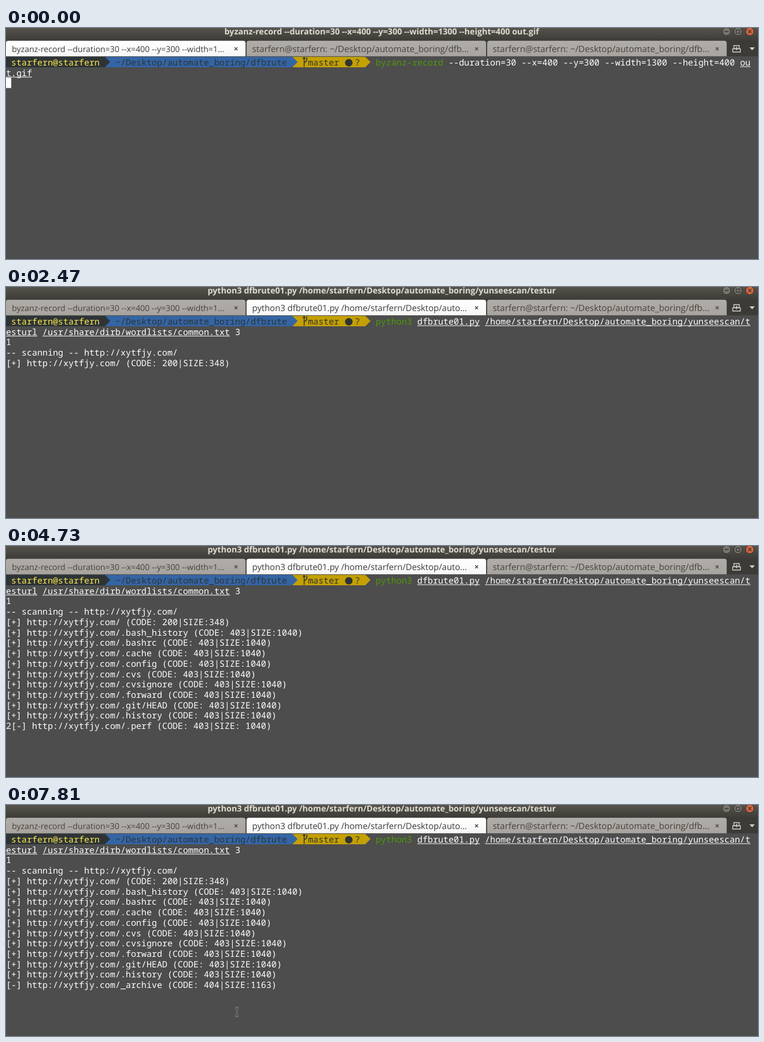
Write an HTML page that moves like this. It is 1280 px wide and 394 px high and loops after 8000 ms.

```html
<!DOCTYPE html>
<html lang="en">
<head>
<meta charset="utf-8">
<title>Terminal scan</title>
<style>
  html, body { margin: 0; width: 100%; height: 100%; overflow: hidden; background: #4d4d4d; }
  svg { display: block; width: 1280px; height: 394px; }
  text { white-space: pre; text-rendering: geometricPrecision; }
  .ui { font-family: "Open Sans", "Noto Sans", sans-serif; }
  .title { font-size: 14.1px; font-weight: 700; fill: #dfdbd2; text-anchor: middle; }
  .mono { font-family: "Noto Sans Mono", "DejaVu Sans Mono", monospace; font-size: 14.77px; fill: #fff; }
  .tab rect { fill: url(#idle); }
  .tab text { fill: #46433e; font-size: 14.9px; }
  .tab path { stroke: #46433e; stroke-width: 1.2; fill: none; }
  .tab.on rect { fill: url(#live); }
  .tab.on text { fill: #3c3c3c; font-size: 14.6px; }
  .tab.on path { stroke: #3c3c3c; }
</style>
</head>
<body>
<svg id="stage" viewBox="0 0 1280 394">
  <defs>
    <linearGradient id="bar" x2="0" y2="1">
      <stop offset="0" stop-color="#55534b"/><stop offset="1" stop-color="#3d3c38"/>
    </linearGradient>
    <linearGradient id="live" x2="0" y2="1">
      <stop offset="0" stop-color="#fff"/><stop offset="1" stop-color="#f4f3f2"/>
    </linearGradient>
    <linearGradient id="idle" x2="0" y2="1">
      <stop offset="0" stop-color="#b0aca7"/><stop offset="1" stop-color="#a5a19c"/>
    </linearGradient>
    <clipPath id="strip"><rect y="21" width="1280" height="27.250"/></clipPath>
  </defs>
  <rect width="1280" height="394" fill="#4d4d4d"/>
  <rect width="1280" height="21" fill="url(#bar)"/>
  <rect y="21" width="1280" height="27.250" fill="#3c3b37"/>
  <text id="title" class="ui title" x="639.5" y="11"></text>

  <g stroke="#33322e" stroke-width="1">
    <circle cx="1226.500" cy="6" r="7" fill="#78756d"/>
    <circle cx="1246" cy="6" r="7" fill="#78756d"/>
    <circle cx="1266" cy="6" r="7" fill="#d9643e"/>
  </g>
  <g stroke="#3a3934" stroke-width="1.300" fill="none">
    <path d="M1223 6h7M1243 3.500h6v5.500h-6zM1263.300 3.300l5.400 5.400M1268.700 3.300l-5.400 5.400"/>
  </g>

  <g id="tabs" clip-path="url(#strip)"></g>
  <g stroke="#d3cfc7" stroke-width="1.400" fill="none">
    <path d="M1239 35v-5h9v5M1237 35.500h13v5.500h-13zM1243.500 32v6M1240.500 35h6"/>
  </g>
  <path d="M1265.500 33h9l-4.500 5z" fill="#d3cfc7"/>

  <g id="prompt">
    <path d="M488 49.230h123.500l9 8.860l-9 8.860H488z" fill="#c4a000"/>
    <path d="M169 49.230h318.400l9 8.860l-9 8.860H169z" fill="#3465a4"/>
    <path d="M0 49.230h168.400l9 8.860l-9 8.860H0z" fill="#2e3436"/>
    <path d="M507.500 50.200v16M512 50.200v4q0 3-4.500 5M505.500 52.700l2-2.500l2 2.500" fill="none" stroke="#2e3436" stroke-width="1.500"/>
    <circle cx="583.500" cy="59.300" r="6.400" fill="#2e3436"/>
  </g>
  <g id="screen"></g>
  <g id="mouse" fill="none">
    <path d="M-3-7h2l1 1l1-1h2M0-6v12M-3 7h2l1-1l1 1h2" stroke="#fff" stroke-width="2.400" stroke-opacity=".7"/>
    <path d="M-3-7h2l1 1l1-1h2M0-6v12M-3 7h2l1-1l1 1h2" stroke="#111" stroke-width="1.200"/>
  </g>
</svg>
<script>
const LOOP = 8000, CELL = 1280 * 9 / 1300, ROW = CELL * 2, TOP = 49.23, BASE = 64;
const USER = "starfern", SITE = "http://xytfjy.com/";
const $ = id => document.getElementById(id);

function add(parent, tag, attrs, text) {
  const el = document.createElementNS("http://www.w3.org/2000/svg", tag);
  for (const k in attrs) el.setAttribute(k, attrs[k]);
  if (text !== undefined) el.textContent = text;
  return parent.appendChild(el);
}

// Text on the character grid, optionally underlined
function put(parent, col, row, text, fill = "#fff", line = false) {
  const x = col * CELL, y = BASE + row * ROW;
  add(parent, "text", { class: "mono", x, y, style: `fill:${fill}` }, text);
  if (line) add(parent, "rect", { x, y: y + 1.5, width: text.length * CELL, height: 1, fill });
}

const prompt = $("prompt");
put(prompt, 1, 0, `${USER}@${USER}`, "#fce94f");
put(prompt, 21, 0, "~/Desktop/automate_boring/dfbrute", "#2e3436");
put(prompt, 58, 0, "master", "#2e3436");
put(prompt, 67, 0, "?", "#2e3436");

const GREEN = "#4e9a06";
const record = [
  [71, 0, "byzanz-record", GREEN],
  [85, 0, "--duration=30 --x=400 --y=300 --width=1300 --height=400"],
  [141, 0, "ou", "#fff", true],
  [0, 1, "t.gif", "#fff", true]
];
const scan = [
  [71, 0, "python3", GREEN],
  [79, 0, "dfbrute01.py", "#fff", true],
  [92, 0, `/home/${USER}/Desktop/automate_boring/yunseescan/t`, "#fff", true],
  [0, 1, "esturl", "#fff", true],
  [7, 1, "/usr/share/dirb/wordlists/common.txt", "#fff", true],
  [44, 1, "3"]
];

const shellName = `${USER}@${USER}: ~/Desktop/automate_boring/`;
const titles = {
  record: "byzanz-record --duration=30 --x=400 --y=300 --width=1300 --height=400 out.gif",
  shell: shellName + "dfbrute",
  scan: `python3 dfbrute01.py /home/${USER}/Desktop/automate_boring/yunseescan/testur`
};
const labels = { shell: shellName + "dfb…", scan: `python3 dfbrute01.py /home/${USER}/Desktop/auto…` };

const tabs = [0, 409.5, 819].map((x, i) => {
  const g = add($("tabs"), "g", { class: "tab" });
  add(g, "rect", { x, y: 21.7, width: 407.7, height: 34, rx: 4 });
  const label = add(g, "text", { class: "ui", x: x + (i ? 9.5 : 10), y: 41 }, labels.shell);
  add(g, "path", { d: `M${x + 389} 33l5 5m0-5l-5 5` });
  return { g, label };
});
tabs[0].label.textContent = "byzanz-record --duration=30 --x=400 --y=300 --width=1…";
tabs[0].label.style.fontSize = "13.9px";

// Finished output lines: [time, text]
const hit = (path, code = 403, size = 1040) => `[+] ${SITE}${path} (CODE: ${code}|SIZE:${size})`;
const lines = [[1920, "1"], [1970, "-- scanning -- " + SITE], [2380, hit("", 200, 348)]];
".bash_history .bashrc .cache .config .cvs .cvsignore .forward .git/HEAD".split(" ")
  .forEach((p, i) => lines.push([2510 + i * 130, hit(p)]));
lines.push([3570, hit(".history")]);

// The last line is overwritten in place: [time, text]
const status = [];
function probe(start, step, paths, denied = true) {
  paths.split(" ").forEach((p, i) => status.push([start + i * step, denied
    ? `2[-] ${SITE}${p} (CODE: 403|SIZE: 1040)`
    : `[-] ${SITE}${p} (CODE: 404|SIZE:1163)`]));
}
probe(3720, 165, ".hta .htaccess .htpasswd");
probe(4200, 126, ".listing .listings .mysql_history .passwd");
probe(4730, 131, ".perf .profile .rhosts .sh_history .ssh .subversion .svn .svn/entries");
probe(5790, 200, ".swf .web");
probe(6230, 300, "@ _", false);
probe(6820, 290, "_adm _admin _ajax", false);
probe(7690, 0, "_archive", false);

// Pointer path: [time, x, y]
const path = [
  [6600, 622, 392], [6820, 496, 376], [7110, 490, 368],
  [7330, 440, 298], [7560, 408, 322], [7810, 393, 353]
];

function pointer(t) {
  if (t < path[0][0]) return null;
  t = Math.floor(t / 55) * 55;
  const i = path.findIndex(p => p[0] > t);
  if (i < 0 || t >= 7755) return path[path.length - 1].slice(1);
  if (i === 0) return path[0].slice(1);
  const [a, b] = [path[i - 1], path[i]];
  const k = a[0] === 6820 ? 0 : (t - a[0]) / (b[0] - a[0]);
  return [a[1] + (b[1] - a[1]) * k, a[2] + (b[2] - a[2]) * k];
}

const blinkOn = t => t < 1280 || (t < 6680 && (t - 1280) % 1200 < 600);

function cursorAt(t, shown) {
  if (t < 250) return [0, 2];
  if (t < 1040) return [71, 0];
  if (t < 1340) return [45, 1];
  return [0, 2 + shown];
}

let lastKey = "";
function draw(t) {
  const shown = lines.filter(l => l[0] <= t).length;
  const now = status.filter(s => s[0] <= t).pop();
  const mode = t < 250 ? "record" : t < 1400 ? "shell" : "scan";
  const cursor = cursorAt(t, shown), lit = blinkOn(t);

  const m = pointer(t);
  $("mouse").style.display = m ? "" : "none";
  if (m) $("mouse").setAttribute("transform", `translate(${m[0]} ${m[1]})`);

  const key = [mode, shown, now, cursor, lit].join();
  if (key === lastKey) return;
  lastKey = key;

  $("title").textContent = titles[mode];
  tabs[1].label.textContent = labels[mode] || labels.shell;
  tabs.forEach((tab, i) => tab.g.classList.toggle("on", i === (mode === "record" ? 0 : 1)));

  const screen = $("screen");
  screen.replaceChildren();
  const command = t < 250 ? record : t < 1040 ? [] : scan;
  command.forEach(run => put(screen, ...run));
  lines.slice(0, shown).forEach((l, i) => put(screen, 0, 2 + i, l[1]));
  if (now) put(screen, 0, 14, now[1]);
  if (lit) {
    const [col, row] = cursor;
    add(screen, "rect", { x: col * CELL, y: TOP + row * ROW, width: CELL, height: ROW, fill: "#fff" });
    if (now) put(screen, col, row, now[1][0], "#3a3a3a");
  }
}

function tick(now) {
  draw(now % LOOP);
  requestAnimationFrame(tick);
}
draw(0);
requestAnimationFrame(tick);
</script>
</body>
</html>
```
